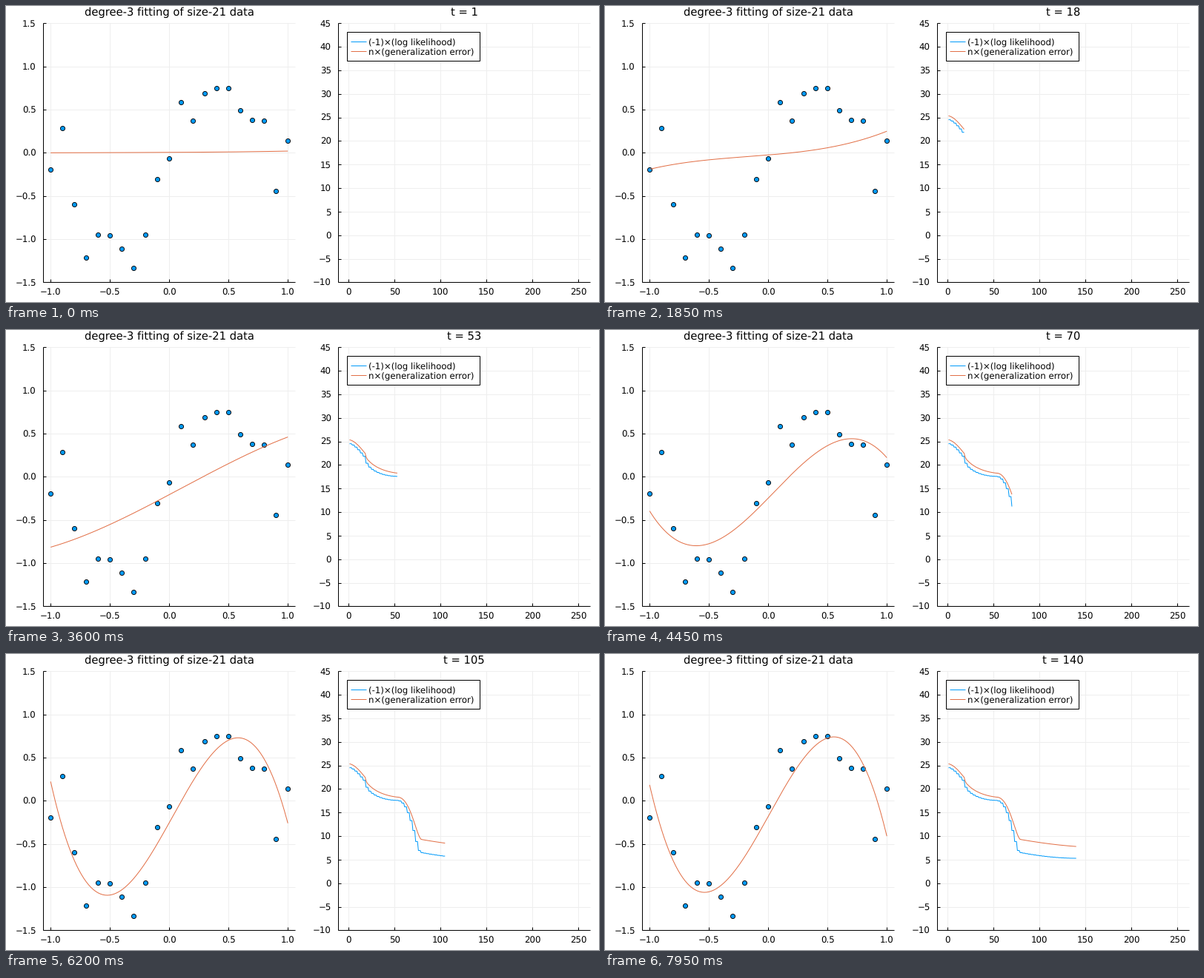
Animation, 800 px wide and 400 px high, one loop 8 s. Source, as a matplotlib script:

```python
import numpy as np
import matplotlib.pyplot as plt
from matplotlib.animation import FuncAnimation
from matplotlib.patches import Rectangle

BLUE, ORANGE, GRID = "#009AFA", "#E26F46", "#EEEEEE"
PX = 0.72  # points per pixel at 100 dpi
INTERVAL, FRAMES, HOLD = 50, 160, 19
NOISE_VARIANCE = 0.083

plt.rcParams["font.family"] = "DejaVu Sans"
plt.rcParams["text.hinting"] = "none"
fig = plt.figure(figsize=(8, 4), dpi=100, facecolor="white")
ax = fig.add_axes([0, 0, 1, 1])
ax.set(xlim=(0, 800), ylim=(400, 0))
ax.axis("off")


def line(xs, ys, color="black", z=2):
    return ax.plot(xs, ys, color=color, lw=PX, zorder=z, solid_capstyle="butt")[0]


def label(x, y, text, size=11.7, ha="center"):
    return ax.text(x, y, text, fontsize=size * PX, ha=ha, va="baseline", zorder=6)


class Panel:
    """Plot area with data-to-pixel mapping, inward ticks and a grid."""
    top, bottom = 23.4, 373.4

    def __init__(self, left, right, x0, x_scale, y_range):
        self.left, self.right = left, right
        self.x0, self.x_scale, self.y_range = x0, x_scale, y_range

    def x(self, v):
        return self.x0 + np.asarray(v) * self.x_scale

    def y(self, v):
        low, high = self.y_range
        return self.bottom - (np.asarray(v) - low) / (high - low) * (self.bottom - self.top)

    def draw(self, x_ticks, y_ticks, fmt):
        for v in x_ticks:
            x = self.x(v)
            line([x, x], [self.top, self.bottom], GRID, z=0)
            line([x, x], [self.bottom, self.bottom - 4])
            label(x, 391, fmt.format(v).replace("-", "\u2212"))
        for v in y_ticks:
            y = self.y(v)
            line([self.left, self.right], [y, y], GRID, z=0)
            line([self.left, self.left + 4], [y, y])
            label(self.left - 9.5, y + 4.6, fmt.format(v).replace("-", "\u2212"), ha="right")
        line([self.left, self.left], [self.top, self.bottom])
        line([self.left, self.right], [self.bottom, self.bottom])


fit = Panel(50.4, 389.8, 220.2, 160, (-1.5, 1.5))
loss = Panel(448.3, 788, 462.2, 1.239, (-10, 45))
fit.draw(np.arange(-1, 1.1, 0.5), np.arange(-1.5, 1.6, 0.5), "{:.1f}")
loss.draw(range(0, 251, 50), range(-10, 46, 5), "{}")

label(220.2, 13, "degree-3 fitting of size-21 data", 14.75)
title = label(618.3, 13, "", 14.75)

# legend
ax.add_patch(Rectangle((460, 35.3), 179, 38.5, fc="white", ec="black", lw=PX, zorder=4))
for y, color, text in ((48.2, BLUE, "(-1)×(log likelihood)"),
                       (61.2, ORANGE, "n×(generalization error)")):
    line([464.5, 486], [y, y], color, z=5)
    label(489, y + 4.2, text, 11.75, ha="left")

sample_x = np.linspace(-1, 1, 21)
sample_y = np.array([
    -.19, .284, -.593, -1.214, -.948, -.954, -1.109, -1.335, -.945, -.309, -.067,
    .588, .372, .69, .749, .749, .494, .379, .372, -.444, .141])
ax.scatter(fit.x(sample_x), fit.y(sample_y), s=(6.1 * PX) ** 2, color=BLUE,
           edgecolors="black", linewidths=0.9 * PX, zorder=3)

# Stages of the fit: step reached, easing power, cubic (highest order first).
STAGES = [
    (1, 1, (.003, .005, .007, .005)),
    (18, 1.7, (.107, .055, .113, -.025)),
    (53, 0.6, (-.09, .03, .728, -.207)),
    (79, 2.2, (-2.67, .36, 2.47, -.308)),
    (140, 1, (-2.772, .0675, 2.475, -.18)),
]


def cubic(t):
    for (t0, _, start), (t1, power, end) in zip(STAGES, STAGES[1:]):
        if t <= t1:
            u = ((t - t0) / (t1 - t0)) ** power
            return (1 - u) * np.array(start) + u * np.array(end)


curve_x = np.linspace(-1, 1, 201)
truth = np.sin(np.pi * curve_x)
n = len(sample_x)


def gaussian_loss(mean_square, variance):
    return n / 2 * (np.log(2 * np.pi * variance) + mean_square / variance)


def losses(t):
    """Training and expected loss; sigma relaxes from 1 to the residual size."""
    c = cubic(t)
    residual = np.mean((sample_y - np.polyval(c, sample_x)) ** 2)
    expected = NOISE_VARIANCE + np.mean((truth - np.polyval(c, curve_x)) ** 2)
    excess = 1 - min((t - 1) / 21, 1) ** 1.5
    sigma = np.sqrt(residual) * (1 - excess) + excess
    return gaussian_loss(residual, sigma ** 2), gaussian_loss(expected, sigma ** 2)


steps = np.arange(1, FRAMES - HOLD)
likelihood, error = np.array([losses(t) for t in steps]).T
likelihood = np.repeat(likelihood[1::3], 3)[:len(steps)]  # improves in small stairs

curve = line([], [], ORANGE, z=4)
like_line = line([], [], BLUE)
error_line = line([], [], ORANGE, z=3)


def update(frame):
    t = max(1, frame - HOLD)
    title.set_text(f"t = {t}")
    curve.set_data(fit.x(curve_x), fit.y(np.polyval(cubic(t), curve_x)))
    for artist, values in ((like_line, likelihood), (error_line, error)):
        artist.set_data(loss.x(steps[:t]), loss.y(values[:t]))
    return title, curve, like_line, error_line


anim = FuncAnimation(fig, update, frames=FRAMES, interval=INTERVAL,
                     repeat=True, repeat_delay=0)
plt.show()
```
